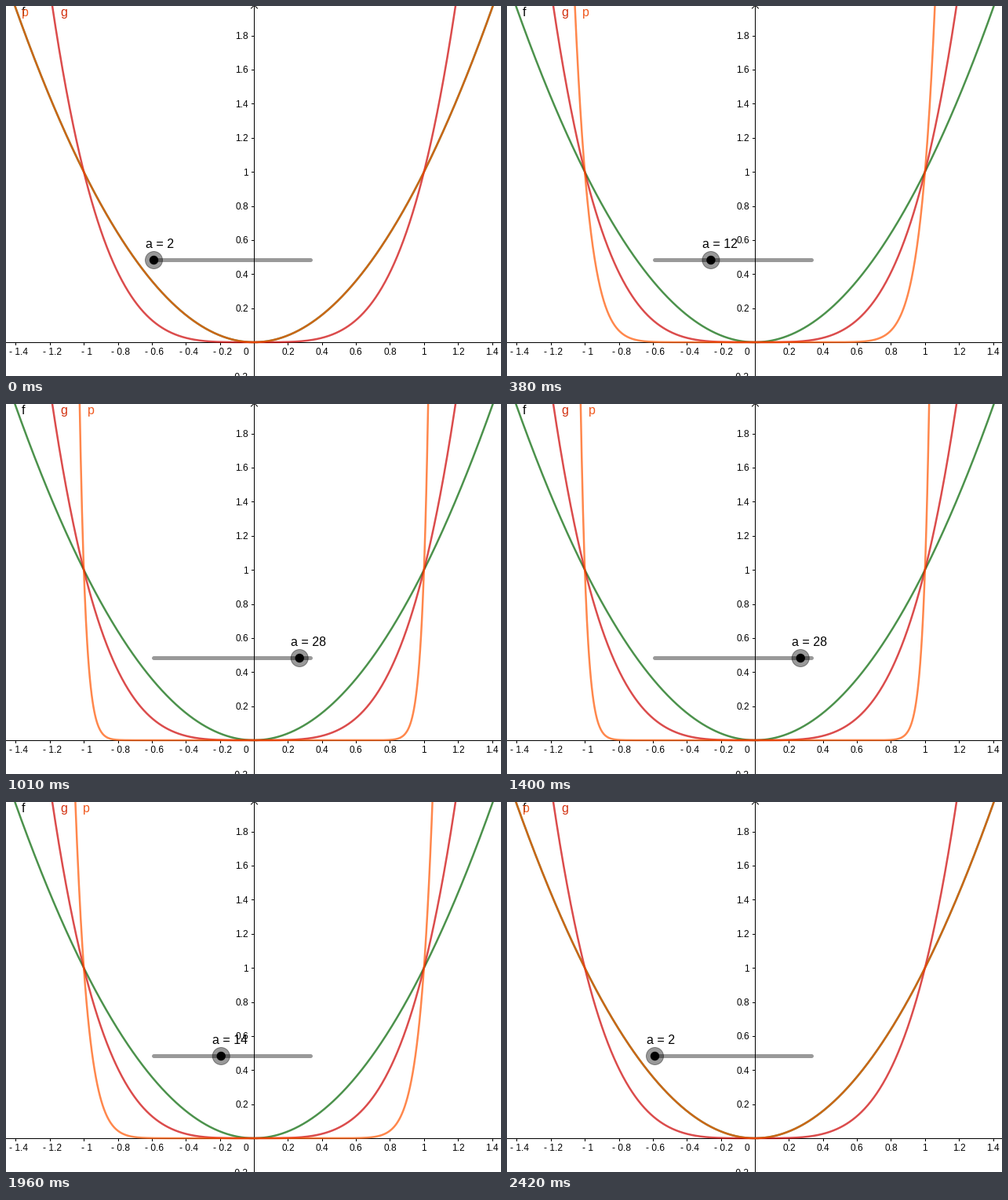
These frames come from a looping animation (631x471 px, 2.49 s). A matplotlib script:

```python
import numpy as np
import matplotlib.pyplot as plt
from matplotlib.animation import FuncAnimation
from matplotlib.patches import Circle

W, H, DPI = 631, 471, 100
PX = 72 / DPI                      # one pixel in points
LOOP, STEP = 2490, 10              # ms
X0, Y0, UNIT = 316, 428, 216.8
SLIDER_X, SLIDER_Y, SLIDER_W = 188.5, 323.5, 200
A_MIN, A_MAX = 2, 30
GREEN, RED, ORANGE = "#006400", "#cc0000", "#ff5500"

plt.rcParams["font.family"] = "Liberation Sans"
plt.rcParams["text.hinting"] = "native"
fig = plt.figure(figsize=(W / DPI, H / DPI), dpi=DPI, facecolor="white")
ax = fig.add_axes([0, 0, 1, 1])
ax.set(xlim=(0, W), ylim=(H, 0))
ax.axis("off")


def stroke(xs, ys, color="black", width=1, **kw):
    return ax.plot(xs, ys, color=color, lw=width * PX, **kw)[0]


def label(x, y, s, size, color="black", **kw):
    return ax.text(x, y, s, size=size * PX, color=color, va="baseline", **kw)


def power_curve(a):
    """Pixel points of |x|^a, ending just above the stage."""
    edge = 2.05 ** (1 / a)
    x = np.linspace(-edge, edge, 801)
    return X0 + UNIT * x, Y0 - UNIT * np.abs(x) ** a


def name_x(a):
    """Left edge of a curve's name, beside its start just above the stage."""
    return round(X0 - UNIT * ((Y0 + 3) / UNIT) ** (1 / a) + 10)


def number(v):
    return f"- {-v:g}" if v < 0 else f"{v:g}"


def draw_axes():
    stroke([0, W], [Y0, Y0], zorder=1)
    stroke([X0, X0], [0, H], zorder=1)
    stroke([X0 - 3.5, X0 + 0.5, X0 + 4.5], [3, -1, 3], zorder=1)
    label(305.5, 444, "0", 12, ha="center", zorder=1)
    for k in range(-7, 8):
        if k == 0:
            continue
        v = k / 5
        x = X0 + UNIT * v
        stroke([x, x], [Y0, Y0 + 3], zorder=1)
        label(x + (3.5 if v < 0 else 0), 444, number(v), 12, ha="center",
              zorder=1)
    for k in range(-1, 10):
        if k == 0:
            continue
        v = k / 5
        y = Y0 - UNIT * v
        s = number(v)
        stroke([X0 - 3, X0], [y, y], zorder=1)
        label(308 - 2.5 * len(s), y + 4.3, s, 12, ha="center", zorder=1,
              clip_on=True)


def change_times():
    parts = [(70, 530), (610, 1090), (1400, 1880), (1960, 2420)]
    t = np.concatenate([np.linspace(a, b, 7) for a, b in parts])
    return np.round(t / 10) * 10


TIMES = change_times()


def exponent(t):
    """Climbs by 2 up to the maximum, waits, then walks back down."""
    n = int(np.searchsorted(TIMES, t, side="right"))
    return A_MIN + 2 * min(n, len(TIMES) - n)


draw_axes()
for power, color in ((2, GREEN), (4, RED)):
    stroke(*power_curve(power), color, 2.5, alpha=0.7, zorder=2)
p_curve = stroke([], [], ORANGE, 2.5, alpha=0.7, zorder=3)

stroke([SLIDER_X, SLIDER_X + SLIDER_W], [SLIDER_Y] * 2, width=5, alpha=0.4,
       solid_capstyle="round", snap=False, zorder=4)
ring = Circle((0, 0), 11, fc="black", ec="black", lw=PX, alpha=0.4, zorder=5)
dot = Circle((0, 0), 5.7, fc="black", lw=0, zorder=6)
ax.add_patch(ring)
ax.add_patch(dot)

label(name_x(2), 13, "f", 16, zorder=7)
label(name_x(4), 13, "g", 16, "#d2300f", zorder=7)
p_name = label(0, 13, "p", 16, "#f0571c", zorder=8)
a_text = label(0, 308, "", 16, zorder=8)


def update(i):
    a = exponent(i * STEP)
    knob = SLIDER_X + SLIDER_W * (a - A_MIN) / (A_MAX - A_MIN)
    p_curve.set_data(*power_curve(a))
    p_name.set_x(name_x(a))
    ring.center = dot.center = (knob, SLIDER_Y)
    a_text.set_x(knob - 11)
    a_text.set_text(f"a = {a}")
    return p_curve, ring, dot, p_name, a_text


anim = FuncAnimation(fig, update, frames=LOOP // STEP, interval=STEP,
                     repeat=True, repeat_delay=0, blit=False)
plt.show()
```
